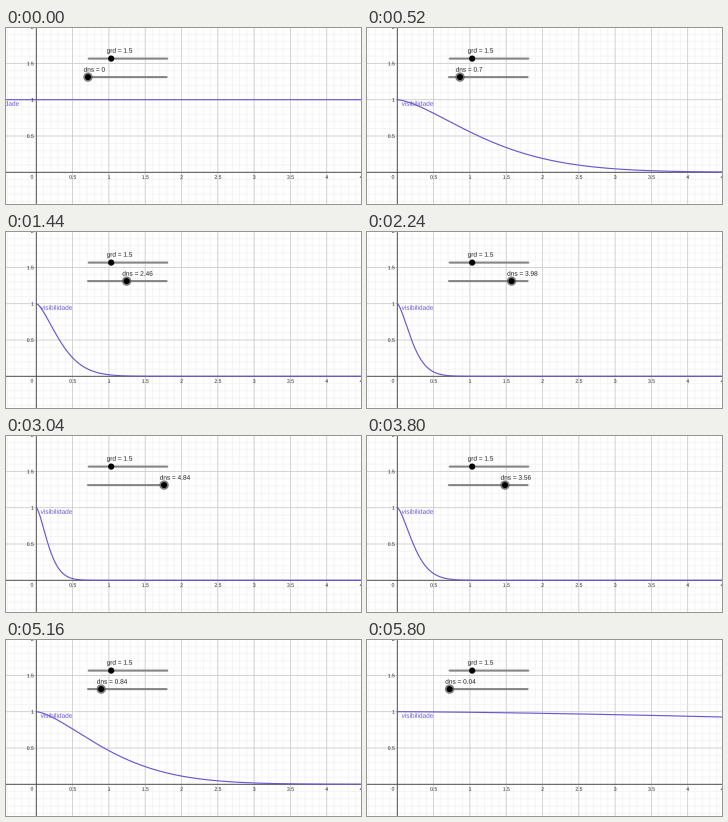
Animation of 355x176 px, one loop 6.04 s. Source, as a matplotlib script:

```python
import matplotlib.pyplot as plt
import numpy as np
from matplotlib.animation import FuncAnimation
from matplotlib.patches import Circle, PathPatch
from matplotlib.textpath import TextPath

W, H = 355, 176
X0, Y0, UNIT = 30.3, 144.3, 72.6      # plot origin and scale in pixels
FRAMES, STEP_MS = 151, 40
GRD = 1.5
PURPLE, DARK = "#6557d2", "#1c1c1c"

# density over time: up to 5 and back down, with short pauses
KEY_FRAMES = [3, 13, 36, 51, 56, 67, 73, 74, 83, 95, 99, 115, 117, 130, 131, 145]
KEY_VALUES = [0, 0.7, 2.46, 3.58, 3.98, 4.62, 5, 5, 4.28, 3.56,
              3.22, 1.9, 1.74, 0.76, 0.76, 0.04]

fig = plt.figure(figsize=(W / 72, H / 72), dpi=72, facecolor="white")
ax = fig.add_axes([0, 0, 1, 1])
ax.set_xlim(0, W)
ax.set_ylim(H, 0)
ax.axis("off")


def px(x):
    return X0 + UNIT * x


def py(y):
    return Y0 - UNIT * y


def text_path(text, x, y, size, align=0.0):
    """Outline of text on baseline y; align 0 is left, 0.5 centre, 1 right."""
    path = TextPath((0, 0), text, size=size, prop={"family": "Liberation Sans"})
    verts = path.vertices * [1, -1]
    width = path.get_extents().x1
    verts = verts + [x - align * width, y]
    return type(path.cleaned())(verts, path.codes)


def add_text(text, x, y, size, color=DARK, align=0.0):
    patch = PathPatch(text_path(text, x, y, size, align), fc=color, ec="none",
                      zorder=6, snap=False)
    return ax.add_patch(patch)


def add_grid(step, color, width):
    xs = px(np.arange(np.ceil(-X0 / UNIT / step), 4.5 / step + 1) * step)
    ys = py(np.arange(np.ceil((Y0 - H) / UNIT / step), 2 / step + 1) * step)
    style = dict(colors=color, linewidths=width, snap=False, zorder=1)
    ax.vlines(xs, 0, H, **style)
    ax.hlines(ys, 0, W, **style)


def add_slider(x, y, length):
    ax.plot([x, x + length], [y, y], color="#868686", lw=2.1,
            solid_capstyle="round", snap=False, zorder=4)


def add_knob(x, y, radius, **style):
    return ax.add_patch(Circle((x, y), radius, ec="none", snap=False, **style))


add_grid(0.1, "#f1f1f1", 0.7)
add_grid(0.5, "#cdcdcd", 0.8)
ax.plot([X0, X0], [0, H], color="#4a4a4a", lw=0.9, snap=False, zorder=2)
ax.plot([0, W], [Y0, Y0], color="#4a4a4a", lw=0.9, snap=False, zorder=2)

for k in range(1, 10):
    add_text(f"{k / 2:g}", px(k / 2), 150.8, 5.1, align=0.5)
for k in range(1, 5):
    add_text(f"{k / 2:g}", 27.6, py(k / 2) + 1.9, 5.1, align=1)
add_text("0", 27.2, 150.6, 5.1, align=1)

add_slider(82.7, 30.6, 78.6)
add_knob(105.2, 30.6, 3.1, fc="black", zorder=5)
add_text(f"grd = {GRD}", 100.6, 24.7, 6.5)

SLIDER_X, SLIDER_Y, SLIDER_LEN = 82, 49.1, 78.6
add_slider(SLIDER_X, SLIDER_Y, SLIDER_LEN)
halo = add_knob(SLIDER_X, SLIDER_Y, 4.7, fc="#555555", alpha=0.75, zorder=5)
knob = add_knob(SLIDER_X, SLIDER_Y, 3.0, fc="black", zorder=5.5)
value_text = add_text("dns = 0", 78, 43.7, 6.5)
curve_text = add_text("visibilidade", 35, 77.8, 6.5, PURPLE)
curve, = ax.plot([], [], color=PURPLE, lw=1.15, snap=False, zorder=3)


def density(frame):
    return round(np.interp(frame, KEY_FRAMES, KEY_VALUES) * 50) / 50


def draw(frame):
    dns = density(frame)
    x = np.linspace(0 if dns else -0.5, 4.6, 500)
    curve.set_data(px(x), py(np.exp(-np.abs(x * dns) ** GRD)))

    knob_x = SLIDER_X + SLIDER_LEN * dns / 5
    halo.center = knob.center = (knob_x, SLIDER_Y)
    value_text.set_path(text_path(f"dns = {dns:g}", knob_x - 4.4, 43.7, 6.5))

    # the constant curve starts off screen and takes its label along
    label_x = 34.6 if dns else -18.6
    curve_text.set_path(text_path("visibilidade", label_x, 77.8, 6.5))
    return curve, halo, knob, value_text, curve_text


# PathPatch has no public path setter
anim = FuncAnimation(fig, draw, frames=FRAMES, interval=STEP_MS, repeat=True,
                     repeat_delay=0, blit=False) if hasattr(value_text, "set_path") else None
plt.show()
```
